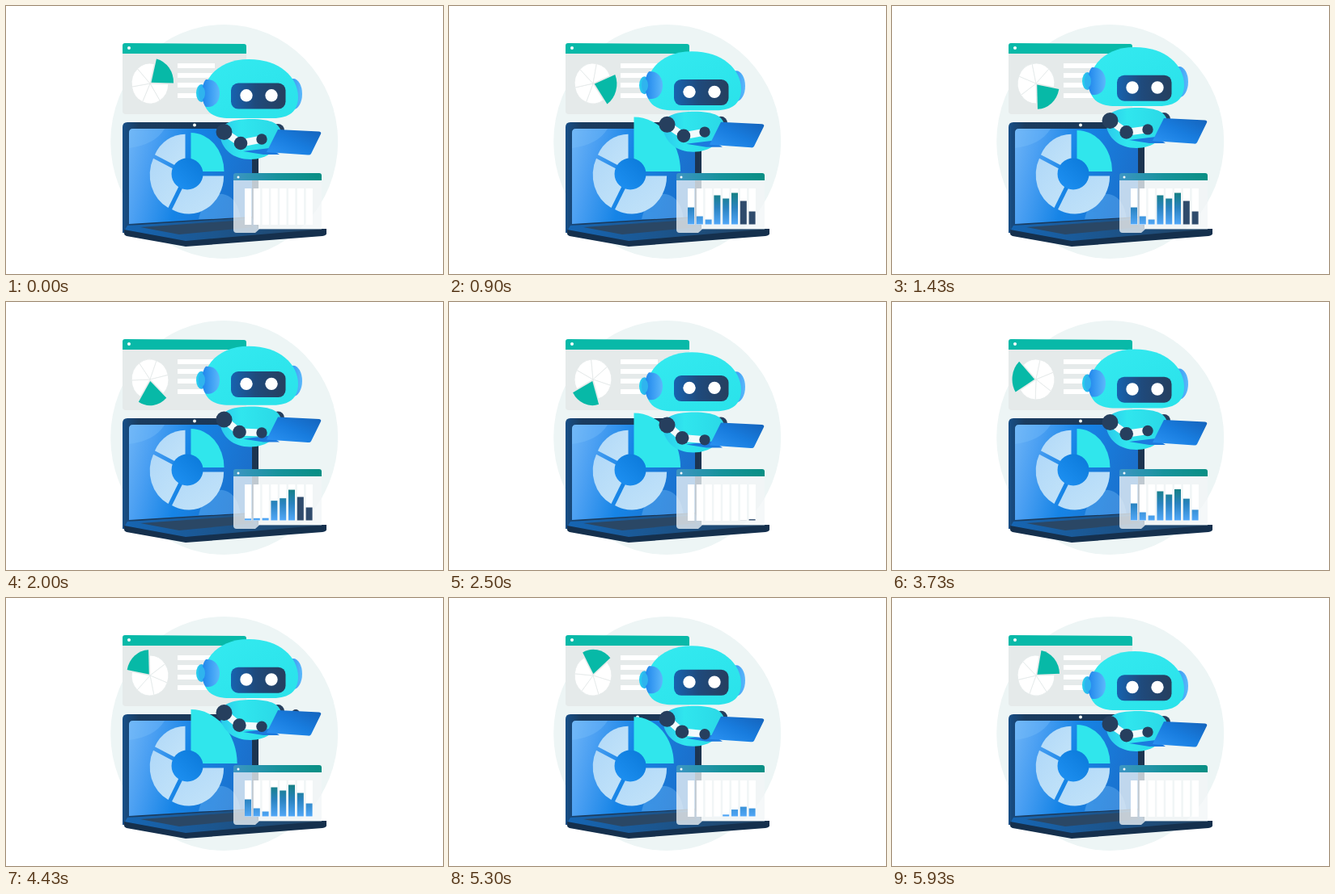
These frames come from a looping animation (540x332 px, 6.01 s). An HTML page:

```html
<!DOCTYPE html>
<html lang="en">
<head>
<meta charset="utf-8">
<title>Robot dashboard</title>
<style>
html, body { margin: 0; width: 100%; height: 100%; overflow: hidden; background: #fff; }
svg { display: block; width: 540px; height: 332px; }
</style>
</head>
<body>
<svg viewBox="0 0 540 332">
  <defs>
    <linearGradient id="screen" x1="0" y1=".1" x2="1" y2=".3">
      <stop offset="0" stop-color="#6ab2f6"/><stop offset=".2" stop-color="#4a9ff2"/>
      <stop offset=".5" stop-color="#1684e6"/><stop offset="1" stop-color="#1b70cc"/>
    </linearGradient>
    <linearGradient id="rim"><stop stop-color="#174f88"/><stop offset=".12" stop-color="#1a3c60"/><stop offset="1" stop-color="#1c3450"/></linearGradient>
    <linearGradient id="deck"><stop stop-color="#1666b4"/><stop offset="1" stop-color="#22415f"/></linearGradient>
    <linearGradient id="hub" x1="0" y1="1" x2="1" y2="0"><stop stop-color="#1f92f4"/><stop offset="1" stop-color="#0a78d8"/></linearGradient>
    <linearGradient id="ring" x1="0" y1="0" x2="1" y2="1"><stop stop-color="#b0d8f8"/><stop offset="1" stop-color="#c4e4f9"/></linearGradient>
    <linearGradient id="ear"><stop stop-color="#1f86ec"/><stop offset="1" stop-color="#5cb8fb"/></linearGradient>
    <linearGradient id="cap"><stop stop-color="#2ad3ee"/><stop offset="1" stop-color="#2b9aee"/></linearGradient>
    <linearGradient id="head" x1="0" y1="0" x2="1" y2="1"><stop stop-color="#34eaf0"/><stop offset="1" stop-color="#2ae2ea"/></linearGradient>
    <linearGradient id="visor"><stop stop-color="#1763b0"/><stop offset=".45" stop-color="#1f4a7c"/><stop offset="1" stop-color="#263f5e"/></linearGradient>
    <linearGradient id="body"><stop stop-color="#2bc9ec"/><stop offset=".35" stop-color="#30e6ee"/><stop offset="1" stop-color="#2ad8e6"/></linearGradient>
    <linearGradient id="lid" x1="0" y1="1" x2="1" y2="0"><stop stop-color="#2c94f4"/><stop offset=".5" stop-color="#187cde"/><stop offset="1" stop-color="#1462ba"/></linearGradient>
    <linearGradient id="bar" gradientUnits="userSpaceOnUse" x1="0" y1="230" x2="0" y2="270"><stop stop-color="#14807f"/><stop offset=".5" stop-color="#2a83c0"/><stop offset="1" stop-color="#50a6f6"/></linearGradient>
    <linearGradient id="strip"><stop stop-color="#3d95c4"/><stop offset=".5" stop-color="#17939c"/><stop offset="1" stop-color="#098f84"/></linearGradient>
    <clipPath id="glass"><path id="glassShape" d="M157 152H300Q304 152 304 156V261L152 270V157Q152 152 157 152Z"/></clipPath>
  </defs>

  <ellipse cx="269.7" cy="168" rx="140.5" ry="145" fill="#edf5f5"/>

  <!-- back window -->
  <path d="M144 59H297V134H148Q144 134 144 130Z" fill="#e5eaea"/>
  <path d="M144 59V49Q144 46 147 46L294 47Q297 47 297 50V59Z" fill="#08b9a8"/>
  <circle cx="152" cy="52" r="2" fill="#fff"/>
  <path d="M212 74H258M212 86H258M212 98H258M212 111H258" stroke="#fff" stroke-width="6"/>
  <g transform="translate(178 96) scale(.95 1.04)"><g id="pie"></g></g>

  <!-- laptop -->
  <path d="M144 281V150Q144 144 150 144H307Q312 144 312 150V278Z" fill="url(#rim)"/>
  <use href="#glassShape" fill="url(#screen)"/>
  <g clip-path="url(#glass)" fill="#7cc0fa" opacity=".35">
    <path d="M152 152H196Q184 172 152 176Z"/>
    <path d="M238 264Q246 230 268 233Q286 236 290 264Z"/>
  </g>
  <path d="M150 272L304 262L312 276L396 276V279L222 293L146 279Z" fill="url(#deck)"/>
  <path d="M166 274L296 265L306 274L214 283Z" fill="#2a4765"/>
  <path d="M146 277L222 291L396 276V282Q396 284 391 285L222 298L149 285Q146 284 146 282Z" fill="#15304d"/>
  <circle cx="233" cy="147.5" r="2" fill="#f4fbf4"/>
  <g transform="translate(224 208)">
    <g id="donut" fill="url(#ring)"></g>
    <path id="quarter" d="M0 0V-48A41 48 0 0 1 41 0Z" fill="#30e6ec"/>
    <circle r="19.5" fill="url(#hub)"/>
  </g>

  <!-- robot -->
  <g id="torso">
    <circle cx="336" cy="154" r="8" fill="#263f5e"/>
    <circle id="rightHand" cx="358" r="5" fill="#263f5e"/>
    <path d="M264 158C266 143 284 140 303 140C328 140 341 146 340 160C339 178 322 190 302 190C281 190 266 178 264 158Z" fill="url(#body)"/>
    <path d="M293 180L326 176L338 184L318 184Z" fill="#1c7ade"/>
    <path d="M336 153L387 155.500Q390 156 389 158.500L377 183Q376 185 373 184.500L322 181Z" fill="url(#lid)"/>
    <path id="arm" fill="none" stroke="#f1fafc" stroke-width="9" stroke-linejoin="round"/>
    <g fill="#263f5e">
      <circle cx="269.500" cy="156" r="10"/>
      <circle id="elbow" r="8.300"/>
      <circle id="hand" cx="316" r="6.700"/>
    </g>
  </g>
  <g id="head-group">
    <ellipse cx="355" cy="109" rx="11" ry="19" fill="url(#ear)"/>
    <path d="M300 66C338 66 361 88 361 113C361 130 350 139 330 139H276C255 139 244 130 244 113C244 88 264 66 300 66Z" fill="url(#head)"/>
    <ellipse cx="241.500" cy="108" rx="6.500" ry="11" fill="url(#cap)"/>
    <path d="M247 91C258 90 264 99 264 108C264 118 258 126 247 125C241 120 241 96 247 91Z" fill="url(#ear)"/>
    <ellipse cx="242" cy="108" rx="4" ry="8" fill="#2fb4ee"/>
  </g>
  <g id="face">
    <rect x="278" y="96" width="67.500" height="32" rx="9" fill="url(#visor)"/>
    <circle cx="297" cy="111.300" r="7.700" fill="#fff"/>
    <circle cx="328" cy="111.300" r="7.700" fill="#fff"/>
  </g>

  <!-- chart window -->
  <path d="M281 216H390V276.500H313L308 281H285Q281 281 281 277Z" fill="#f3f6f7" opacity=".77"/>
  <path d="M281 216V210Q281 207 284 207H387Q390 207 390 210V216Z" fill="url(#strip)"/>
  <circle cx="287" cy="212" r="1.500" fill="#fff"/>
  <g id="chart"></g>
</svg>
<script>
const LOOP = 6010, TAU = Math.PI * 2;
const $ = id => document.getElementById(id);
const clamp = x => Math.min(1, Math.max(0, x));
const ease = x => (x = clamp(x), x * x * (3 - 2 * x));
const wave = (t, period) => (1 - Math.cos(TAU * t / period)) / 2;

function make(parent, tag, attrs) {
  const el = document.createElementNS('http://www.w3.org/2000/svg', tag);
  for (const k in attrs) el.setAttribute(k, attrs[k]);
  return parent.appendChild(el);
}
const set = (el, k, v) => el.setAttribute(k, v);
const lift = (id, y) => set($(id), 'transform', `translate(0 ${-y})`);

// Degrees run clockwise from twelve o'clock.
const polar = (deg, rx, ry = rx) =>
  `${rx * Math.sin(deg * TAU / 360)} ${-ry * Math.cos(deg * TAU / 360)}`;
const sector = (from, to, rx, ry = rx) =>
  `M0 0L${polar(from, rx, ry)}A${rx} ${ry} 0 ${to - from > 180 ? 1 : 0} 1 ${polar(to, rx, ry)}Z`;

const HALF = 39, STEP = (360 - 2 * HALF) / 5;
for (let i = 0; i < 5; i++) {
  const from = HALF + i * STEP;
  make($('pie'), 'path', { d: sector(from, from + STEP, 24), fill: '#fff', stroke: '#e5eaea', 'stroke-width': 0.8 });
}
make($('pie'), 'path', { d: sector(-HALF, HALF, 29), transform: 'translate(0 -2)', fill: '#07b9a7' });

for (const [from, to] of [[90, 208], [208, 296], [296, 360]]) {
  const mid = (from + to) / 2;
  const gap = 2.5 / Math.sin((to - from) * TAU / 720);
  make($('donut'), 'path', { d: sector(from, to, 46.5 - gap, 50 - gap), transform: `translate(${polar(mid, gap)})` });
}

const heights = [21, 10, 6, 36, 32, 39, 29, 16];
const bars = heights.map((h, i) => {
  const x = 295 + i * 10.8;
  make($('chart'), 'rect', { x, y: 226, width: 8.3, height: 45, fill: '#fff' });
  return make($('chart'), 'rect', { x, width: 8, fill: 'url(#bar)' });
});

function draw(t) {
  set($('pie'), 'transform', `rotate(${52.5 + t * 0.06})`);

  const d = t % 2000;
  const grow = 1 + 0.405 * (ease(d / 500) - ease((d - 1000) / 600));
  set($('quarter'), 'transform', `translate(4.5 -3) scale(${grow})`);

  const p = t % 3000;
  bars.forEach((bar, i) => {
    const h = heights[i] * (ease((p - 50 - i * 50) / 480) - ease((p - 1600 - i * 70) / 500));
    set(bar, 'y', 270.5 - h);
    set(bar, 'height', h);
    set(bar, 'fill', i > 5 && t < 3000 ? '#2f4b6c' : 'url(#bar)');
  });

  const bob = wave(t, 3000);
  lift('torso', 14 * bob);
  lift('head-group', 15 * bob);
  lift('face', 11 * wave(t - 200, 3000));

  const beat = 6000 / 13, tap = wave(t, beat);
  const ex = 290 - 2 * tap, ey = 170 + 2 * tap, hy = 165 + 10 * tap;
  set($('elbow'), 'cx', ex);
  set($('elbow'), 'cy', ey);
  set($('hand'), 'cy', hy);
  set($('arm'), 'd', `M269.5 156L${ex} ${ey}L316 ${hy}`);
  set($('rightHand'), 'cy', 163 - 6 * Math.cos(TAU * (t - 290) / beat));
}

// Twenty pictures a second, held alternately for 30 and 70 ms.
function frame() {
  const t = performance.now() % LOOP;
  const n = Math.min(119, 2 * Math.floor(t / 100) + (t % 100 >= 30 ? 1 : 0));
  draw(n * 50);
  requestAnimationFrame(frame);
}
frame();
</script>
</body>
</html>
```
